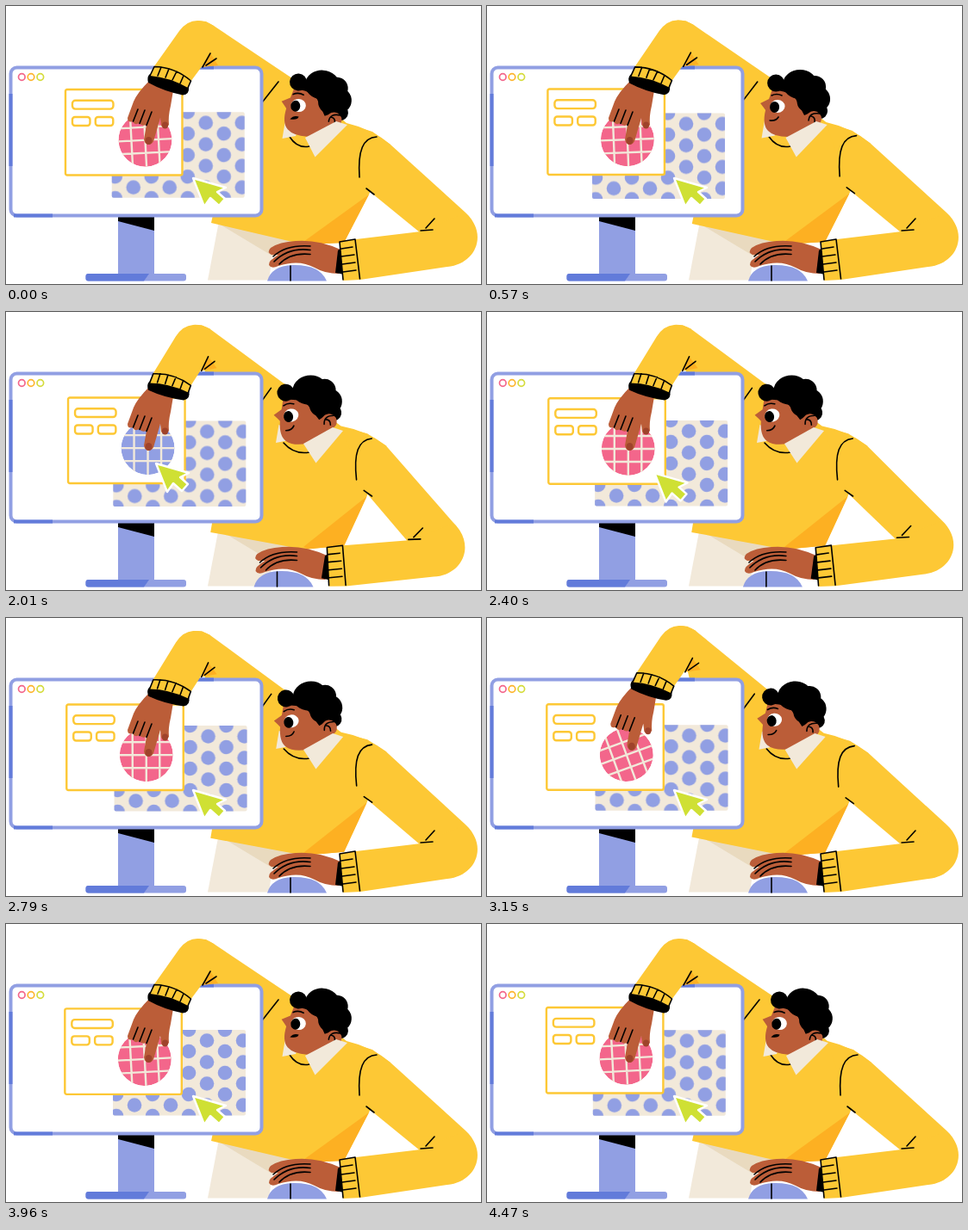
An HTML page that plays this animation: 551x323 px, repeating every 4500 ms.

```html
<!DOCTYPE html>
<html lang="en">
<head>
<meta charset="utf-8">
<title>Designer at work</title>
<style>
html, body { margin: 0; width: 100%; height: 100%; overflow: hidden; background: #fff; }
svg { display: block; width: 100%; height: 100%; }
.y { fill: #fdc835; } .o { fill: #fdb022; } .skin { fill: #bb5d38; } .nail { fill: #9f432b; }
.b { fill: #919fe3; } .d { fill: #627bda; } .cream { fill: #f2e9da; } .tan { fill: #e9dabf; }
.ink { fill: none; stroke: #000; stroke-width: 1.6; stroke-linecap: round; stroke-linejoin: round; }
.box { fill: #fff; stroke: #fdc835; stroke-width: 2.4; }
.rim, .shade { fill: none; stroke: #919fe3; stroke-width: 4; }
.shade { stroke: #627bda; }
</style>
</head>
<body>
<svg viewBox="0 0 551 323">
  <defs>
    <pattern id="dots" width="42" height="25" patternUnits="userSpaceOnUse">
      <g class="b">
        <circle cx="4" cy="0" r="8.3"/><circle cx="4" cy="25" r="8.3"/>
        <circle cx="46" cy="0" r="8.3"/><circle cx="46" cy="25" r="8.3"/>
        <circle cx="25" cy="12.5" r="8.3"/>
      </g>
    </pattern>
    <clipPath id="disc"><circle r="31"/></clipPath>
  </defs>

  <!-- trousers and torso -->
  <path class="cream" d="M247 250L234 318.5H305L312 270Z"/>
  <path class="tan" d="M247 253L345 270V282L310 291Z"/>
  <path id="upperLeft" class="y"/>
  <g id="torso">
    <path class="y" d="M331 83L395 136Q425 143 446 161L421 219L392 275L345 277L238 252L260 150Z"/>
    <path class="o" d="M421 219L345 274L350 277L392 275Z"/>
    <path class="ink" d="M290 121L316 88"/>
  </g>

  <!-- resting arm -->
  <path id="upperRight" class="y"/>
  <path class="ink" id="armLine" d="M430 152C414 153 408 168 410 199M418 212L427 219"/>
  <g id="mouse">
    <path class="b" d="M303 319.5Q308 302 332 301Q364 300 372 319.5Z"/>
    <path class="ink" d="M330 302V319"/>
    <path class="skin" d="M388 283Q362 271 336 273Q317 274 307 281Q302 286 308 289L316 289Q304 296 305 301Q308 306 316 302Q340 294 358 304Q370 311 386 311Z"/>
    <path class="ink" d="M310 291Q325 277 353 279M311 297Q328 280 353 283.500M317 300Q330 286 353 288.500"/>
  </g>
  <g id="foreRight">
    <path d="M385 284L390 280L393 312L382 310Z"/>
    <path class="y" d="M533 240C560 265 545 300 512 303L411 318L391 319L387 274L406 271L481 262Z"/>
    <path class="ink" d="M391 318L387 274L405 271L410.500 317M389 282L402 280M389 291L404 289M390 300L405 298M391 309L406 307M487 258L497 247M481 261L495 260"/>
  </g>

  <!-- monitor -->
  <path class="b" d="M130 245H172V313H130Z"/>
  <path d="M130 245H172V261L130 250Z"/>
  <rect class="b" x="92.500" y="311" width="116.500" height="8.500" rx="3"/>
  <path class="d" d="M95.500 311H166L160 319.500H95.500Q92.500 319.500 92.500 316.500V314Q92.500 311 95.500 311Z"/>
  <rect class="rim" x="5.500" y="71.500" width="291" height="172" rx="7" style="fill:#fff"/>
  <path class="shade" d="M5.500 102V186M9 243.500H54M204 71.500H241"/>
  <g fill="none" stroke-width="1.700">
    <circle cx="18.300" cy="82.500" r="3.800" stroke="#f3668b"/>
    <circle cx="29" cy="82.500" r="3.800" stroke="#fdb52e"/>
    <circle cx="39.800" cy="82.500" r="3.800" stroke="#d5dc3c"/>
  </g>

  <!-- artboards -->
  <g id="sheet">
    <rect class="cream" width="154" height="99.500" rx="2"/>
    <rect fill="url(#dots)" width="154" height="99.500" rx="2"/>
  </g>
  <g id="card">
    <rect class="box" width="135.500" height="99.500" rx="2"/>
    <rect class="box" x="8" y="12.800" width="47.500" height="9.800" rx="3.500"/>
    <rect class="box" x="8" y="32" width="20.500" height="10" rx="3"/>
    <rect class="box" x="34.800" y="32" width="20.500" height="10" rx="3"/>
    <g transform="translate(92.500 58.700)">
      <g id="ball" clip-path="url(#disc)">
        <circle id="fill" r="31"/>
        <path d="M-16 -31V31M0 -31V31M15.500 -31V31M-31 -15H31M-31 0H31M-31 15H31" fill="none" stroke="#f2e9da" stroke-width="2.400"/>
      </g>
    </g>
  </g>

  <!-- reaching arm -->
  <g id="hand">
    <path class="skin" d="M168 85Q152 101 148 111L141 130Q141 136 147 134Q149 139 155 136Q157 140 163 138L160 155Q161 161 166 161Q171 160 172 154L179 130L180 139Q184 145 189 138Q188 128 191 116L194 98Z"/>
    <ellipse class="nail" cx="165.500" cy="156.500" rx="4" ry="4.500"/>
    <ellipse class="nail" cx="184.500" cy="138.500" rx="3.500" ry="4"/>
    <path class="ink" d="M147.500 134L153 120M155 136.500L161 121M163 138.500L169 123"/>
  </g>
  <g id="foreLeft">
    <path class="o" d="M227 71L237 55L246 69Z"/>
    <path class="y" d="M172 70L201 29Q210 17 222 17Q232 17 241 23L252 40L237 57L214 88L192 80Z"/>
    <path d="M167 79Q190 81 212 94Q213 103 205 103.500Q183 99 165 89Q163 82 167 79Z"/>
    <path class="y" d="M172 70Q196 71 215 86L211 95Q190 83 167 81Z"/>
    <path class="ink" d="M167 81L172 70.500Q196 71 214.500 87L211 95M180 71L176 81M189 73L185 83M198 76L193 86M206 81L202 90M228 71L237 55M232 69L244 61"/>
  </g>

  <!-- collar and head -->
  <path id="neck" class="ink"/>
  <path id="collarLeft" class="cream" d="M324 133L320.500 154L336 151L340 140Z"/>
  <g id="head">
    <path class="skin" d="M331 96L327 108L317 113Q321 118 323 121Q319 138 326 145Q333 152 349 152L359 150L382 141L384 105L355 90Z"/>
    <g>
      <circle cx="335" cy="89.500" r="10"/>
      <ellipse cx="363" cy="91" rx="20" ry="17"/>
      <circle cx="380" cy="94" r="13"/>
      <circle cx="383" cy="108" r="15"/>
      <circle cx="372" cy="111" r="12.500"/>
      <circle cx="386" cy="122" r="9"/>
      <path d="M337 98Q352 100 358 108L368 127L375 124L380 90H340Z"/>
    </g>
    <circle class="skin" cx="379" cy="131" r="9"/>
    <path class="ink" d="M386 125Q374 123 373 133M376 128Q381 129 380 135"/>
    <path class="ink" d="M330 104Q336 101 342 104"/>
    <g id="open">
      <ellipse cx="337" cy="116.500" rx="8.500" ry="7.500" fill="#fff"/>
      <ellipse cx="333.500" cy="117.500" rx="5.500" ry="6.500"/>
    </g>
    <path id="shut" class="ink" d="M327 116Q334 121 345 113"/>
    <path id="frown" d="M328 133Q332 128 338 129.500Q337 134 328 133Z"/>
    <path id="smile" class="ink" d="M328 133Q335 134 338 129"/>
    <g id="talk">
      <path d="M328 130Q335 131 340 127Q340 136 331 138Z"/>
      <path id="tongue" d="M330 133Q335 134 338 131Q337 135 331.500 136Z"/>
    </g>
  </g>
  <path id="collarRight" class="cream"/>

  <path id="cursor" d="M0 0L38 11L28 16L37 24L30 32L20 23L13 33Z" fill="#cfe034" stroke="#fff" stroke-width="2.400" stroke-linejoin="round"/>
</svg>
<script>
const LOOP = 4500, STEP = 30;
const $ = id => document.getElementById(id);
const set = (id, name, value) => $(id).setAttribute(name, value);
const show = (id, on) => set(id, 'visibility', on ? 'visible' : 'hidden');

const span = (t, a, b) => Math.min(1, Math.max(0, (t - a) / (b - a)));
const sine = (t, a, b) => 0.5 - 0.5 * Math.cos(Math.PI * span(t, a, b));
const cubic = (t, a, b) => {
  const p = span(t, a, b);
  return p < 0.5 ? 4 * p ** 3 : 1 - 4 * (1 - p) ** 3;
};

// A rigid move: turn about (cx, cy), then shift.
const pose = (deg, cx, cy, dx = 0, dy = 0) => {
  const r = deg * Math.PI / 180, c = Math.cos(r), s = Math.sin(r);
  return {
    attr: `translate(${dx} ${dy}) rotate(${deg} ${cx} ${cy})`,
    at: (x, y) => [
      cx + dx + (x - cx) * c - (y - cy) * s,
      cy + dy + (x - cx) * s + (y - cy) * c
    ]
  };
};
const poly = (...pts) => 'M' + pts.map(p => p.join(' ')).join('L') + 'Z';
const orbit = (id, x, y, r, deg) => {
  const a = deg * Math.PI / 180;
  set(id, 'transform', `translate(${x + r * Math.cos(a)} ${y + r * Math.sin(a)})`);
};

function draw(t) {
  const turn = 360 * t / LOOP;
  const lean = sine(t, 280, 1130) - sine(t, 2640, 3950);
  const lift = 1.1 * (sine(t, 2800, 3360) - sine(t, 3360, 3900));
  const slide = cubic(t, 700, 1450) - cubic(t, 2050, 2700);
  const point = cubic(t, 800, 1550) - cubic(t, 2080, 2730);

  const torso = pose(-2.7 * lean, 320, 270);
  const left = pose(-4 * lean + 1.5 * lift, 190, 88, 3 * lift, -9.5 * lift);
  const right = pose(2.3 * slide, 398, 295, -15.5 * slide);

  set('torso', 'transform', torso.attr);
  set('armLine', 'transform', torso.attr);
  set('foreLeft', 'transform', left.attr);
  set('foreRight', 'transform', right.attr);
  set('hand', 'transform', `translate(${3 * lift} ${-9.5 * lift})`);
  set('mouse', 'transform', `translate(${-15.5 * slide} 0)`);
  set('head', 'transform', pose(3.5 - 13 * lean, 355, 155).attr);

  set('upperLeft', 'd', poly(left.at(222, 17), left.at(232, 18), left.at(241, 23),
    torso.at(332, 84), torso.at(330, 150), [240, 90], left.at(230, 66)));
  set('upperRight', 'd', poly(torso.at(395, 137), torso.at(425, 146), torso.at(446, 161),
    right.at(533, 240), right.at(520, 270), right.at(480, 263), torso.at(420, 214)));

  set('collarLeft', 'transform', `translate(${-7.5 * lean} ${-2 * lean})`);
  set('collarRight', 'd', poly([347 - 2 * lean, 153], [358.5 + lean, 175.5],
    [396 - 5 * lean, 138], [383 - 4 * lean, 134]));
  set('neck', 'd', `M${329 - 7 * lean} 152Q${338 - 4 * lean} 166 352 163`);

  orbit('card', 70.3, 98.5, 2, 228 + turn);
  orbit('sheet', 123.8, 124.7, 1.8, 234 - turn);
  set('ball', 'transform', `rotate(${-25 * lift - 3 * (1 - lean)})`);
  set('fill', 'fill', t >= 1590 && t < 2340 ? '#919fe3' : '#f3668b');
  set('cursor', 'transform', `translate(${217 - 43 * point} ${200 - 24 * point})`);

  const blink = t >= 1110 && t < 1320;
  const talk = t >= 930 && t < 1590 || t >= 3210 && t < 3900;
  const frown = t < 300 || t >= 3900;
  show('open', !blink);
  show('shut', blink);
  show('talk', talk);
  show('frown', frown);
  show('smile', !talk && !frown);
  set('tongue', 'fill', t < 2000 ? '#fff' : '#f3668b');
}

const start = performance.now();
function tick() {
  const t = (performance.now() - start) % LOOP;
  draw(Math.floor(t / STEP) * STEP);
  requestAnimationFrame(tick);
}
tick();
</script>
</body>
</html>
```
